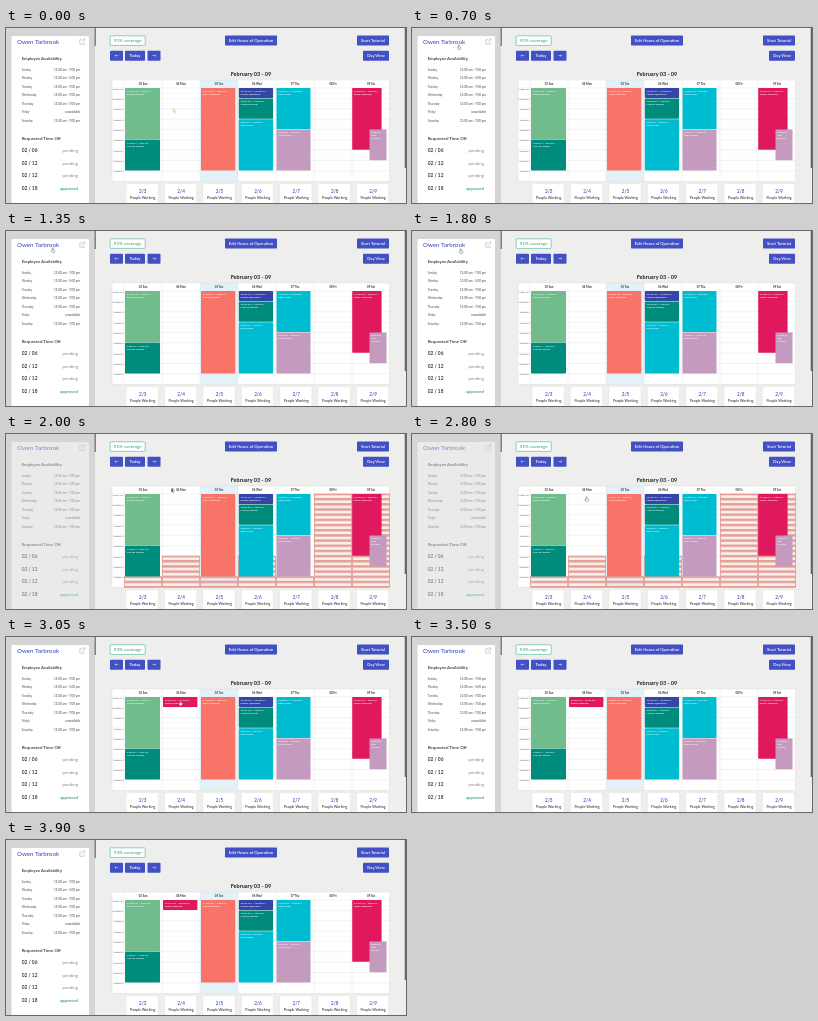
An HTML page that plays this animation: 400x175 px, repeating every 3.95 s.

```html
<!DOCTYPE html>
<html lang="en">
<head>
<meta charset="utf-8">
<title>Shift planner</title>
<style>
html, body { margin: 0; width: 100%; height: 100%; overflow: hidden; background: #eeefed; }
svg { display: block; width: 100vw; height: 100vh; font-family: Lato, "Open Sans", sans-serif; }
</style>
</head>
<body>
<svg id="stage" viewBox="0 0 400 175" preserveAspectRatio="none"></svg>
<script>
const LOOP = 3950, DRAG = 2000, DROP = 3050;
const INDIGO = '#4350c4', GREEN = '#27a277', TEAL = '#008c7c', CYAN = '#00bcd0',
      CRIMSON = '#e0185e', MAUVE = '#c49abf';
const EMPLOYEE = 'Owen Tarbrook';
const LEFT = 118, COL = 38, TOP = 60, HOUR = 10.35, END = 153.2;
const days = ['Sun', 'Mon', 'Tue', 'Wed', 'Thu', 'Fri', 'Sat'];
const stage = document.getElementById('stage');

function add(parent, tag, attrs, content) {
  const el = document.createElementNS('http://www.w3.org/2000/svg', tag);
  for (const k in attrs) el.setAttribute(k, attrs[k]);
  if (content !== undefined) el.textContent = content;
  parent.appendChild(el);
  return el;
}
const group = (parent = stage) => add(parent, 'g', {});
const rect = (g, x, y, width, height, fill, more) =>
  add(g, 'rect', { x, y, width, height, fill, ...more });
const text = (g, x, y, size, fill, str, more) =>
  add(g, 'text', { x, y, 'font-size': size, fill, ...more }, str);
const line = (g, d, stroke, w = 0.4) =>
  add(g, 'path', { d, stroke, 'stroke-width': w, fill: 'none' });
const mid = { 'text-anchor': 'middle' }, end = { 'text-anchor': 'end' };
const bold = { 'font-weight': 700 };
const colX = i => LEFT + COL * i;
const rowY = h => TOP + HOUR * h;
const clock = h => `${(h + 10) % 12 + 1}:00 ${h + 11 < 12 ? 'AM' : 'PM'}`;

// Sidebar
rect(stage, 0, 0, 89, 175, '#d4d5d4');
const side = group();
rect(side, 5.5, 8, 77.5, 170, '#fff', { rx: 1 });
text(side, 11, 15.8, 6.2, INDIGO, EMPLOYEE, { 'font-weight': 500 });
line(side, 'M76 11.7H73.8V16.3H78.1V14.1M75.8 14.2L78.6 11.1M76.8 10.9H78.8V12.8', '#9ba1cb', 0.5);
text(side, 15.7, 32.3, 4.25, '#444', 'Employee Availability', bold);
['Sunday', 'Monday', 'Tuesday', 'Wednesday', 'Thursday', 'Friday', 'Saturday'].forEach((day, i) => {
  const y = 42.5 + 8.5 * i;
  text(side, 15.7, y, 2.9, '#555', day);
  text(side, 74, y, 3, '#444',
    i === 5 ? 'unavailable' : `11:00 am - ${i === 1 ? 5 : 7}:00 pm`, end);
});
text(side, 15.7, 111.8, 4.4, '#444', 'Requested Time Off', bold);
['06', '12', '12', '18'].forEach((d, i) => {
  const y = 124 + 12.5 * i, ok = i === 3;
  text(side, 15.7, y, 4.8, '#222', '02 / ' + d, { 'font-weight': 600 });
  text(side, 72, y, 4.4, ok ? GREEN : '#888', ok ? 'approved' : 'pending',
    { ...end, 'font-weight': ok ? 600 : 400 });
});
rect(stage, 88.6, 0, 1.2, 18, '#666');

// Toolbar
function button(x, y, w, label) {
  rect(stage, x, y, w, 10, INDIGO, { rx: 0.8 });
  text(stage, x + w / 2, y + 6.4, 4.2, '#fff', label, { ...mid, 'font-weight': 600 });
}
rect(stage, 104.2, 7.8, 35, 9.6, '#fff', { rx: 0.8, stroke: GREEN, 'stroke-width': 0.5 });
const coverage = text(stage, 121.7, 14.2, 4.5, GREEN, '', mid);
button(219, 7.5, 52, 'Edit Hours of Operation');
button(351, 7.5, 32, 'Start Tutorial');
button(104, 22.7, 13, '←');
button(119, 22.7, 20, 'Today');
button(141.5, 22.7, 13, '→');
button(357, 22.7, 26, 'Day View');
text(stage, 245, 47.8, 5.5, '#222', 'February 03 - 09', { ...mid, ...bold });

// Calendar grid
rect(stage, 106, 52, 277.5, END - 52, '#fff');
rect(stage, colX(2), 52, COL, END - 52, '#e3f1f9');
for (let h = 0; h < 9; h++) {
  line(stage, `M106 ${rowY(h)}H383.5`, '#dcdedd');
  line(stage, `M${LEFT} ${rowY(h + 0.5)}H383.5`, '#eff0ef', 0.3);
  text(stage, 117.3, rowY(h) + 1.5, 2.6, '#444', clock(h), end);
}
days.forEach((day, i) => {
  line(stage, `M${colX(i)} 52V${END}`, '#dcdedd');
  text(stage, colX(i) + COL / 2, 56.6, 2.8, '#333', `0${i + 3} ${day}`, { ...mid, ...bold });
});
rect(stage, 106, 52, 277.5, END - 52, 'none', { stroke: '#d6d8d7', 'stroke-width': 0.4 });

// Blocked hours, shown while dragging; bars are centred on the half-hour lines
const blocked = group();
const pattern = add(add(stage, 'defs', {}), 'pattern', {
  id: 'bars', x: 0, y: TOP - 1.2, width: 10, height: HOUR / 2, patternUnits: 'userSpaceOnUse'
});
rect(pattern, 0, 0, 10, 6, '#f8dcd5', { opacity: 0.5 });
rect(pattern, 0, 0, 10, 2.4, '#e4a097');
[8, 6, 8, 6, 8, 0, 0].forEach((h, i) =>
  rect(blocked, colX(i) + 0.4, rowY(h), COL - 0.8, END - rowY(h), 'url(#bars)',
    { stroke: '#de8f86', 'stroke-width': 0.7 }));

// Shifts
function shift(x, w, from, to, fill, name) {
  const g = group(), y = rowY(from), narrow = w < 20;
  rect(g, x, y + 0.1, w, HOUR * (to - from) - 0.4, fill, { rx: 0.7 });
  const rows = narrow ? [clock(from) + ' -', ...name.split(' ')]
                      : [`${clock(from)} - ${clock(to)}`, name];
  rows.forEach((s, i) => text(g, x + 1.8, y + 4 + 2.9 * i, 2.6, '#fff', s, { 'font-weight': 600 }));
  return g;
}
shift(119, 35, 0, 5, '#70bc8d', 'Dorian Pellway');
shift(119, 35, 5, 8, TEAL, 'Marcus Yelland');
shift(195, 34.3, 0, 8, '#f97468', 'Celia Vanstrom');
shift(232.8, 34.3, 0, 1, '#3445a8', 'Lorena Quillmere');
shift(232.8, 34.3, 1, 3, TEAL, 'Marcus Yelland');
shift(232.8, 34.3, 3, 8, CYAN, 'Petra Lund');
shift(270.5, 34, 0, 4, CYAN, 'Petra Lund');
shift(270.5, 34, 4, 8, MAUVE, 'Kim Orvella');
shift(346.2, 29.4, 0, 6, CRIMSON, EMPLOYEE);
shift(363.5, 17, 4, 7, MAUVE, 'Kim Orvella');
const dropped = shift(157, 34.4, 0, 1, CRIMSON, EMPLOYEE);

// Daily totals
days.forEach((_, i) => {
  const x = 136.2 + 38.4 * i;
  rect(stage, x - 16, 155.7, 32, 24, '#fff', { rx: 0.8, stroke: '#dfe0df', 'stroke-width': 0.4 });
  text(stage, x + 0.5, 164.8, 4.6, INDIGO, '2/' + (i + 3), { ...mid, 'font-weight': 600 });
  text(stage, x + 0.5, 171, 3.6, '#333', 'People Working', { ...mid, 'font-weight': 500 });
});
rect(stage, 398.7, 0, 1.3, 140, '#666');

// Pointers, with the hot spot at the origin
const pointer = group();
const arrow = add(pointer, 'path', {
  d: 'M-1 -2V2.3L0.1 1.3L0.9 3L1.7 2.6L0.9 1H2.3Z',
  fill: '#f4eda0', stroke: '#c6c08a', 'stroke-width': 0.3
});
const hand = add(pointer, 'path', {
  d: 'M-0.7 -2.1Q-0.2 -2.6 0.2 -2.1V-0.5L1.5 -0.2Q2 0 1.9 0.8L1.4 2.4H-0.8L-1.9 0.6Q-1.7 0 -0.7 0.7Z',
  fill: '#fff', stroke: '#444', 'stroke-width': 0.4
});
const load = group(pointer);
rect(load, -1.7, -2, 2, 3.4, '#4a528c');
rect(load, -0.2, -0.6, 2, 2.8, '#e8e8e4', { stroke: '#555', 'stroke-width': 0.3 });

const path = [
  [0, 168, 82], [150, 150, 73], [350, 104, 46], [500, 65, 27], [700, 47, 19],
  [1800, 49, 20], [2000, 167, 56.5], [2200, 170, 60], [2400, 173, 63],
  [2600, 174.7, 65], [3050, 174.5, 66], [3200, 176, 70], [3350, 173, 77]
];
const show = (el, on) => el.setAttribute('visibility', on ? 'visible' : 'hidden');

function draw(t) {
  const dragging = t >= DRAG && t < DROP;
  const [, x, y] = path.filter(p => p[0] <= t).pop();
  const lifting = t >= DRAG && t < 2200;
  const pointing = t >= 700 && t < 3200 && !lifting;
  const visible = t < 3500;
  side.setAttribute('opacity', dragging ? 0.5 : 1);
  coverage.textContent = (t < DROP ? 91 : 93) + '% coverage';
  show(blocked, dragging);
  show(dropped, t >= DROP);
  pointer.setAttribute('transform', `translate(${x} ${y})`);
  show(arrow, visible && !pointing && !lifting);
  show(hand, visible && pointing);
  show(load, lifting);
}

const start = performance.now();
function tick() {
  draw((performance.now() - start) % LOOP);
  requestAnimationFrame(tick);
}
draw(0);
requestAnimationFrame(tick);
</script>
</body>
</html>
```
